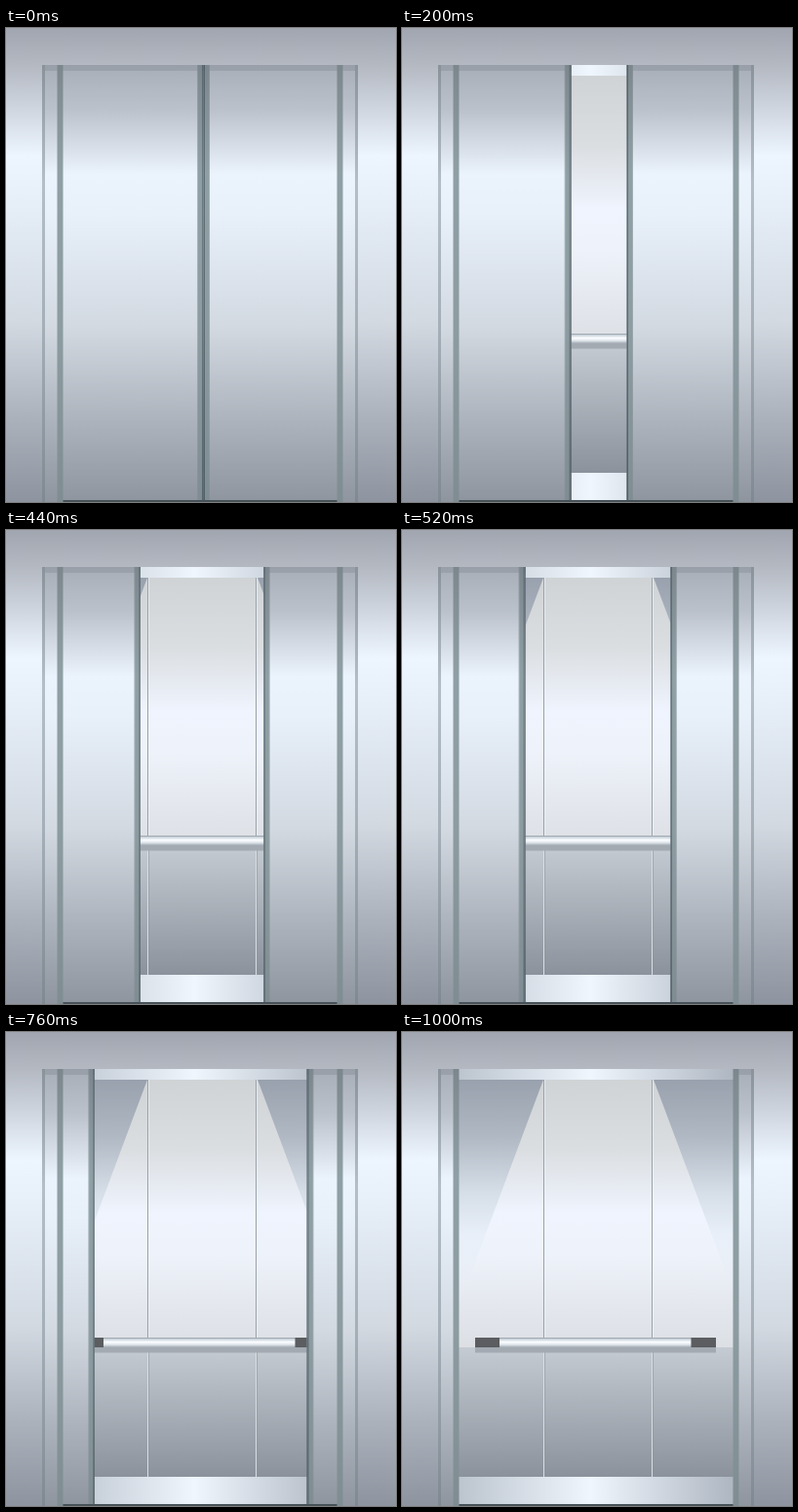
Animation of 400x487 px, one loop 1200 ms. Source, as an HTML page:

```html
<!DOCTYPE html>
<html lang="en">
<head>
<meta charset="utf-8">
<title>Elevator doors</title>
<style>
  html, body { margin: 0; width: 100%; height: 100%; overflow: hidden; background: #a3a8b2; }
  svg { display: block; width: 400px; height: 487px; }
  .door { animation: 1200ms infinite; }
  .left { animation-name: open-left; }
  .right { animation-name: open-right; }
  /* 25 jumps of 40 ms, then a 200 ms rest */
  @keyframes open-left {
    0% { transform: translateX(0); animation-timing-function: steps(25, end); }
    83.3333%, 100% { transform: translateX(-147px); }
  }
  @keyframes open-right {
    0% { transform: translateX(0); animation-timing-function: steps(25, end); }
    83.3333%, 100% { transform: translateX(140px); }
  }
</style>
</head>
<body>
<svg viewBox="0 0 400 487" xmlns="http://www.w3.org/2000/svg">
  <defs>
    <linearGradient id="wall" gradientUnits="userSpaceOnUse" x1="0" y1="0" x2="0" y2="487">
      <stop offset="0" stop-color="#a0a5af"/>
      <stop offset=".08" stop-color="#b4b9c2"/>
      <stop offset=".27" stop-color="#edf5ff"/>
      <stop offset=".37" stop-color="#e6eef8"/>
      <stop offset=".62" stop-color="#d2d9e1"/>
      <stop offset=".82" stop-color="#abb2bc"/>
      <stop offset="1" stop-color="#8d949f"/>
    </linearGradient>
    <linearGradient id="steel" gradientUnits="userSpaceOnUse" x1="0" y1="38" x2="0" y2="487">
      <stop offset="0" stop-color="#a8aeb8"/>
      <stop offset=".1" stop-color="#bbc1cb"/>
      <stop offset=".25" stop-color="#ebf3fd"/>
      <stop offset=".34" stop-color="#e8f0fa"/>
      <stop offset=".6" stop-color="#d2d9e1"/>
      <stop offset=".82" stop-color="#abb2bb"/>
      <stop offset="1" stop-color="#8e959f"/>
    </linearGradient>
    <linearGradient id="trim" gradientUnits="userSpaceOnUse" x1="0" y1="38" x2="0" y2="487">
      <stop offset="0" stop-color="#7c878d"/>
      <stop offset=".25" stop-color="#8fa0a5"/>
      <stop offset=".6" stop-color="#8c9ca1"/>
      <stop offset="1" stop-color="#7f8d92"/>
    </linearGradient>
    <linearGradient id="rim" gradientUnits="userSpaceOnUse" x1="0" y1="38" x2="0" y2="487">
      <stop offset="0" stop-color="#8a929a"/>
      <stop offset=".27" stop-color="#b3bfc7"/>
      <stop offset=".6" stop-color="#a4afb7"/>
      <stop offset="1" stop-color="#7f8991"/>
    </linearGradient>
    <linearGradient id="back" gradientUnits="userSpaceOnUse" x1="0" y1="49" x2="0" y2="324">
      <stop offset="0" stop-color="#d0d3d5"/>
      <stop offset=".26" stop-color="#dbdee1"/>
      <stop offset=".5" stop-color="#eff4fe"/>
      <stop offset=".65" stop-color="#eef2fa"/>
      <stop offset="1" stop-color="#dcdfe4"/>
    </linearGradient>
    <linearGradient id="shade" gradientUnits="userSpaceOnUse" x1="0" y1="49" x2="0" y2="282">
      <stop offset="0" stop-color="#98a1ad"/>
      <stop offset=".25" stop-color="#b0b8c3"/>
      <stop offset=".5" stop-color="#d6dee8"/>
      <stop offset=".68" stop-color="#e8eff8"/>
      <stop offset="1" stop-color="#e8eef6" stop-opacity="0"/>
    </linearGradient>
    <linearGradient id="lower" x1="0" y1="0" x2="0" y2="1">
      <stop offset="0" stop-color="#c5cbd2"/>
      <stop offset="1" stop-color="#8b929c"/>
    </linearGradient>
    <linearGradient id="gloss" gradientUnits="userSpaceOnUse" x1="58" y1="0" x2="340" y2="0">
      <stop offset="0" stop-color="#bcc4ce"/>
      <stop offset=".48" stop-color="#eff6fd"/>
      <stop offset="1" stop-color="#aeb6c1"/>
    </linearGradient>
    <linearGradient id="tube" x1="0" y1="0" x2="0" y2="1">
      <stop offset="0" stop-color="#8d979e"/>
      <stop offset=".15" stop-color="#c9d2da"/>
      <stop offset=".45" stop-color="#fbfdff"/>
      <stop offset=".7" stop-color="#e3e9ef"/>
      <stop offset="1" stop-color="#a3acb4"/>
    </linearGradient>
    <clipPath id="opening"><rect x="58" y="38" width="282" height="449"/></clipPath>

    <g id="jamb">
      <rect x="37" y="38" width="21" height="449" fill="url(#steel)"/>
      <rect x="37" y="38" width="21" height="6" fill="#59636d" fill-opacity=".2"/>
      <rect x="37" y="38" width="3" height="449" fill="url(#rim)"/>
      <rect x="52.5" y="38" width="6" height="449" fill="url(#trim)"/>
    </g>
    <g id="seam">
      <path d="M145.5 49V324" stroke="#98a1a8"/>
      <path d="M146.5 49V324" stroke="#f4f8fc" stroke-opacity=".6"/>
      <path d="M145.5 329V457" stroke="#d9dfe4"/>
      <path d="M146.5 329V457" stroke="#8d959d" stroke-opacity=".6"/>
    </g>
  </defs>

  <rect width="400" height="487" fill="url(#wall)"/>

  <g clip-path="url(#opening)">
    <!-- cabin -->
    <rect x="58" y="49" width="282" height="275" fill="url(#back)"/>
    <path d="M58 49H145L58 282ZM340 49H258L340 268Z" fill="url(#shade)"/>
    <rect x="58" y="324" width="282" height="133" fill="url(#lower)"/>
    <use href="#seam"/>
    <use href="#seam" x="111"/>
    <rect x="58" y="38" width="282" height="11" fill="url(#gloss)"/>
    <rect x="58" y="457" width="282" height="28" fill="url(#gloss)"/>

    <!-- handrail -->
    <rect x="75" y="324" width="247" height="5.5" fill="#a3aab2"/>
    <rect x="75" y="314" width="247" height="10" fill="url(#tube)"/>
    <path d="M75 314h25v10H75ZM296.500 314h25.500v10h-25.500Z" fill="#5b5d60"/>

    <!-- doors -->
    <g class="door left">
      <rect x="40" y="38" width="162.600" height="449" fill="url(#steel)"/>
      <rect x="40" y="38" width="162.600" height="6" fill="#59636d" fill-opacity=".2"/>
      <rect x="196.300" y="38" width="5" height="449" fill="url(#trim)"/>
      <rect x="201.300" y="38" width="1.300" height="449" fill="#43525a"/>
    </g>
    <g class="door right">
      <rect x="202.500" y="38" width="162" height="449" fill="url(#steel)"/>
      <rect x="202.500" y="38" width="162" height="6" fill="#59636d" fill-opacity=".2"/>
      <rect x="203.800" y="38" width="5" height="449" fill="url(#trim)"/>
      <rect x="202.500" y="38" width="1.300" height="449" fill="#43525a"/>
    </g>
    <rect x="58" y="485" width="282" height="2" fill="#465158"/>
  </g>

  <use href="#jamb"/>
  <use href="#jamb" transform="matrix(-1 0 0 1 398 0)"/>
</svg>
</body>
</html>
```
